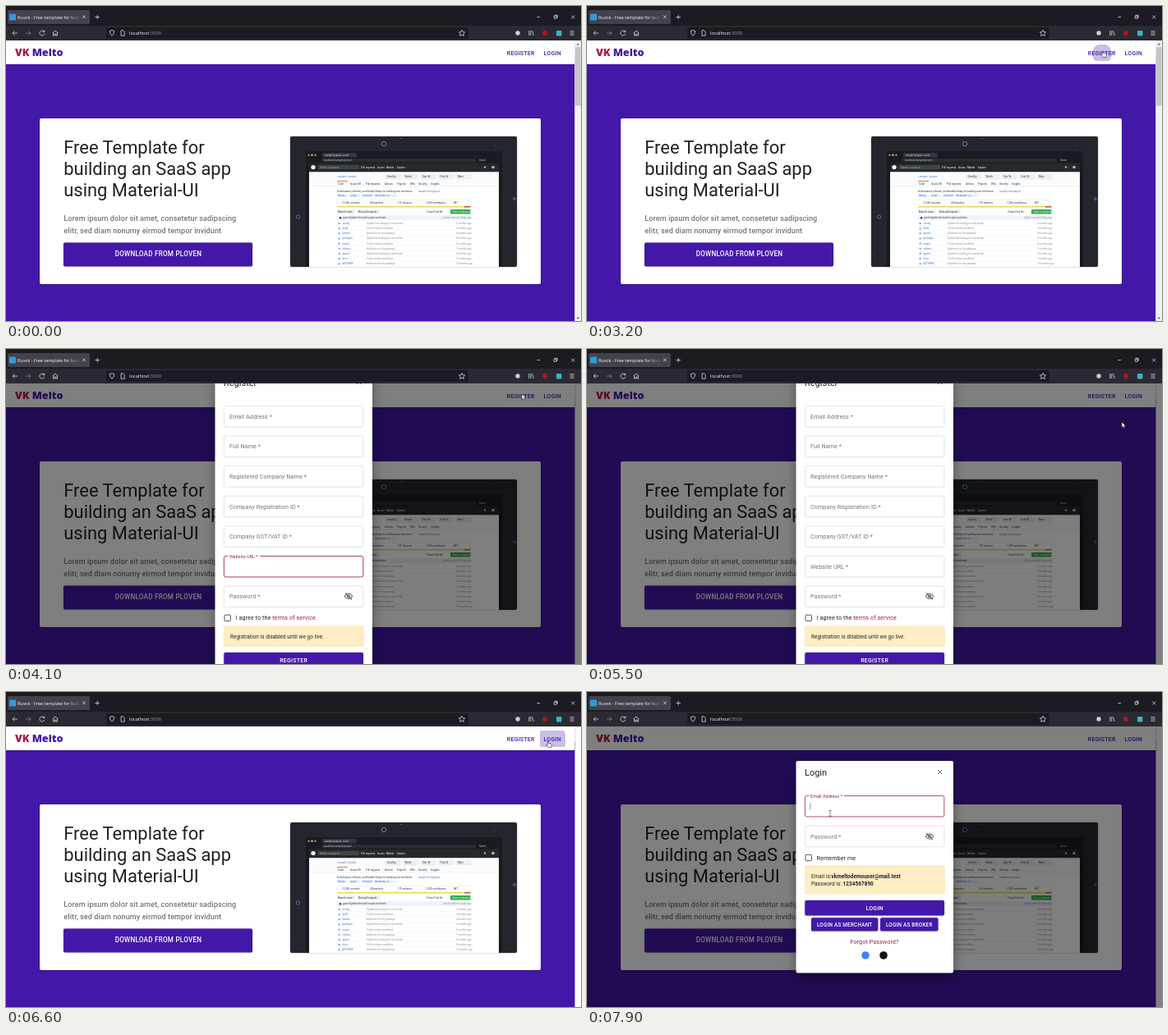
An HTML page that plays this animation: 700 by 384 pixels, repeating every 8000 ms.

```html
<!DOCTYPE html>
<html lang="en">
<head>
<meta charset="utf-8">
<title>App template demo</title>
<style>
  html, body { margin: 0; width: 100%; height: 100%; overflow: hidden; background: #fff; }
  svg { display: block; width: 700px; height: 384px; font-family: Roboto, sans-serif; }
  .ui { font-family: "Open Sans", sans-serif; fill: #fbfbfe; }
  .line { fill: none; stroke: #e4e4ea; stroke-width: .75; }
  .body { font-size: 7.2px; letter-spacing: .07px; }
  .note { font-size: 6.4px; letter-spacing: .06px; fill: #222; }
  .caps { font-weight: 500; font-size: 7px; letter-spacing: .25px; }
  .mid { text-anchor: middle; }
  .tiny { font-size: 3px; }
  .shade { filter: drop-shadow(0 .8px 1px rgba(0, 0, 0, .3)); }
  .lift { filter: drop-shadow(0 6px 7px rgba(0, 0, 0, .35)); }
</style>
</head>
<body>
<svg id="stage" viewBox="0 0 700 384"></svg>
<script>
const PURPLE = '#4318a9', WINE = '#9c1c44', GREY = '#757575', INK = '#212121';
const LOOP = 8000;

const rect = (x, y, w, h, fill, r = 0, more = '') =>
  `<rect x="${x}" y="${y}" width="${w}" height="${h}" fill="${fill}" rx="${r}" ${more}/>`;
const dot = (x, y, r, fill, more = '') => `<circle cx="${x}" cy="${y}" r="${r}" fill="${fill}" ${more}/>`;
const line = (d, more = '') => `<path class="line" d="${d}" ${more}/>`;
const text = (x, y, s, cls, fill, more = '') =>
  `<text x="${x}" y="${y}" class="${cls}" ${fill ? `fill="${fill}"` : ''} ${more}>${s}</text>`;
const size = px => `font-size="${px}"`;

function browserBar() {
  return rect(0, 0, 700, 24.5, '#1c1b22') + rect(0, 24, 700, 18, '#2b2a33') +
    rect(2, 5, 100, 17, '#42414d', 2) + rect(4, 9.5, 8, 8, '#2f9bd8', 1) +
    `<g mask="url(#tabFade)">${text(14, 15.6, 'Ruvok - Free template for build', 'ui', '', size(5.4))}</g>` +
    line('M93 11.5l3.6 3.6m0-3.6l-3.6 3.6M108.5 13.5h5.4m-2.7-2.7v5.4') +
    line('M646.5 13.5h3.6M667.2 12.2h3v3h-3zM668.2 12.2v-1h3v3h-1M688.4 11.6l3.8 3.8m0-3.8l-3.8 3.8') +
    line('M14 33h-6m2.6-2.6l-2.6 2.6l2.6 2.6') +
    line('M24 33h6m-2.6-2.6l2.6 2.6l-2.6 2.6', 'opacity=".5"') +
    line('M46.3 31.2a3 3 0 1 0 .5 2.6M46.8 29.5v2.2h-2.2') +
    line('M56.7 33l3.3-3l3.3 3M57.6 32.3v3.8h1.6v-2h1.6v2h1.6v-3.8') +
    rect(122, 26, 441, 14, '#1c1b22', 2) +
    line('M129 29.6l2.7 .9q0 4-2.7 5.7q-2.7-1.7-2.7-5.7z') +
    line('M140 29.8h2.6l1.6 1.6v4.8h-4.2z') +
    text(150, 35.2, 'localhost<tspan fill="#9a99a2">:3000</tspan>', 'ui', '', size(5.8)) +
    line('M555 29.3l1.1 2.4l2.6 .3l-1.9 1.8l.5 2.6l-2.3-1.3l-2.3 1.3l.5-2.6l-1.9-1.8l2.6-.3z') +
    dot(623, 33, 2.7, '#cfcfd6') +
    line('M636.8 30v6M638.8 30v6M640.4 30.2l2 5.8') +
    dot(656, 33, 3, '#b51622') + rect(670, 30, 6.4, 6.4, '#35b8c4', 1) +
    line('M686.4 30.8h5.2m-5.2 2.2h5.2m-5.2 2.2h5.2');
}

function repoPicture() {
  let seed = 7;
  const rnd = () => (seed = seed * 16807 % 2147483647) / 2147483647;
  const blue = '#3d74c9', pale = '#8a8f96', dark = '#30343a';
  const tiny = (x, y, s, fill) => text(x, y, s, 'tiny', fill);
  let out = rect(346, 159, 276, 159, '#24262d', 2, 'class="shade"');
  for (let i = 0; i < 42; i++) out += dot(348 + rnd() * 272, 161 + rnd() * 155, .25 + rnd() * .35, '#aab');
  out += dot(460, 168, 2.7, 'none', 'stroke="#8a8de0" stroke-width=".8"') +
    dot(355.5, 257, 2.2, 'none', 'stroke="#6f74c8" stroke-width=".8"') +
    line('M619 232.5v5m-2.5-2.5h5', 'style="stroke:#777be0"') +
    rect(365, 177, 239, 141, '#191b20', 2) + rect(385, 179, 42, 5.5, '#33363d', 1);
  ['#ec6a5e', '#f4bf4f', '#61c554'].forEach((c, i) => out += dot(368.5 + i * 4, 181.7, 1.2, c));
  out += tiny(388, 183, 'sample/project: a tool', '#ddd') +
    rect(384, 186, 188, 4.5, '#2a2d33', 2) + tiny(387, 189.3, 'localhost/sample/project', '#bbb') +
    tiny(576, 189.3, 'Guest', '#ccc') +
    rect(369, 191.5, 231, 11, '#24292e') + dot(374, 196.5, 2.6, '#fff') +
    rect(380, 194, 50, 5, '#3f4448', 1) + tiny(382, 197.7, 'Search or jump to', '#aaa') +
    ['Pull requests', 'Issues', 'Market', 'Explore'].map((s, i) =>
      tiny([432, 452, 463, 476][i], 197.6, s, '#fff')).join('') +
    dot(583, 196.5, 1.2, '#bbb') + dot(593, 196.5, 1.8, '#bbb') +
    rect(369, 202.5, 231, 115.5, '#fff') + rect(369, 202.5, 231, 17.5, '#fafbfc') +
    tiny(403, 209.3, '▪ sample / project', blue);
  for (let i = 0; i < 5; i++)
    out += rect(462 + i * 21.5, 205.7, 18, 5, '#eef0f2', .8, 'stroke="#ccc" stroke-width=".3"') +
      tiny(464 + i * 21.5, 209.3, ['Used by', 'Watch', 'Star 9k', 'Fork 2k', 'More'][i], dark);
  out += rect(403, 213, 13, .8, '#e36209');
  ['Code', 'Issues 50', 'Pull requests', 'Actions', 'Projects', 'Wiki', 'Security', 'Insights'].forEach((s, i) =>
    out += tiny(404 + [0, 15, 34, 57, 72, 88, 98, 113][i], 217.5, s, dark));
  out += rect(369, 219.8, 231, .4, '#ddd') +
    tiny(403, 226.7, 'A declarative, efficient, and flexible library for building user interfaces.', dark) +
    tiny(502, 226.7, 'sample.test/project', blue);
  ['library', 'script', 'frontend', 'declarative', 'ui'].forEach((s, i) =>
    out += rect(403 + i * 15, 229.4, 13.5, 3.6, '#e7f1fb', .8) + tiny(404 + i * 15, 232.2, s, blue));
  out += rect(403, 236.5, 162, 7.5, '#fff', 0, 'stroke="#ddd" stroke-width=".4"');
  ['12,345 commits', '40 branches', '110 releases', '1,200 contributors', 'MIT'].forEach((s, i) =>
    out += tiny(409 + i * 34, 241.3, s, dark));
  out += rect(403, 244, 158, 1.5, '#ecdc4f') + rect(558, 244, 7.5, 1.5, '#c9533d') +
    rect(403, 248.2, 22, 5, '#eef0f2', .6) + tiny(404, 251.8, 'Branch: main', dark) +
    rect(427, 248.2, 28, 5, '#eef0f2', .6) + tiny(429, 251.8, 'New pull request', dark) +
    tiny(512, 251.8, 'Create  Find file', dark) +
    rect(541, 248, 24.5, 5.4, '#2faa4b', .6) + tiny(543, 251.8, 'Clone or download', '#fff') +
    rect(403, 255.2, 162.5, 6, '#edf3fa') + dot(407, 258.2, 1.2, '#333') +
    tiny(410, 259.2, 'guest Update the build scripts and tests', dark) + tiny(532, 259.2, 'Latest commit 2 days ago', pale);
  const names = ['.config', '.build', 'fixtures', 'packages', 'scripts', '.editorrc', '.ignore', '.lintrc', 'AUTHORS'];
  names.forEach((s, i) => {
    const y = 266 + i * 6.15;
    out += rect(403, y + 1.6, 162.5, .3, '#e4e6e8') + rect(404.5, y - 2, 2.3, 2, '#79a9d9', .3) +
      tiny(409, y, s, blue) +
      tiny(439, y, ['Update the tooling for new builds', 'Fix the release workflow', 'Add tests for the package'][i % 3], pale) +
      tiny(548, y, (i + 2) + ' months ago', pale);
  });
  return out;
}

function page() {
  const title = ['Free Template for', 'building an SaaS app', 'using Material-UI'];
  const lead = ['Lorem ipsum dolor sit amet, consetetur sadipscing', 'elitr, sed diam nonumy eirmod tempor invidunt'];
  return rect(0, 42, 700, 342, '#fff') + rect(0, 60, 692.5, 324, PURPLE) +
    rect(0, 42, 692.5, 29, '#fff', 0, 'class="shade"') +
    text(11, 61.3, `VK <tspan fill="${PURPLE}">Melto</tspan>`, '', '#b01550',
      'font-family="Open Sans, sans-serif" font-weight="800" font-size="12.6"') +
    `<g clip-path="url(#navClip)"><circle id="ripple" fill="${PURPLE}"/></g>` +
    text(609.8, 59.6, 'REGISTER', 'caps', PURPLE) + text(654.5, 59.6, 'LOGIN', 'caps', PURPLE) +
    rect(41, 137, 610, 202, '#fff', 2, 'class="shade"') +
    title.map((s, i) => text(70.3, 180 + i * 25.8, s, '', INK, size(21.9))).join('') +
    lead.map((s, i) => text(70.3, 262.3 + i * 14.6, s, '', GREY, 'font-weight="500" letter-spacing=".07" font-size="9.1"')).join('') +
    rect(70, 288.5, 230, 29, PURPLE, 1.8, 'class="shade"') +
    text(185.5, 305.3, 'DOWNLOAD FROM PLOVEN', 'mid', '#fff', 'font-weight="500" letter-spacing=".23" font-size="8.15"') +
    repoPicture() +
    `<g id="scroll">${rect(692.5, 42, 7.5, 342, '#f1f1f1')}${rect(693, 50, 6.5, 71.5, '#c6c6c6')}
      <path fill="#555" d="M694.5 47.5l1.8-2l1.8 2zM694.5 379.8l1.8 2l1.8-2z"/></g>`;
}

const eye = y => `<g transform="translate(417 ${y})" fill="none" stroke="#666" stroke-width="1.1">
  <path d="M-4.8 0Q0-6.4 4.8 0Q0 6.4-4.8 0zM-4-4L4 4"/><circle r="1.5"/></g>`;
const cross = y => line(`M427 ${y - 2.6}l5.2 5.2m0-5.2l-5.2 5.2`, 'style="stroke:#555;stroke-width:1"');
const alertBox = (y, h) => rect(265.3, y, 170, h, '#ffedc4', 1.5, 'stroke="#f8dea2" stroke-width=".6"');
const check = (y, s) => rect(266, y - 3.6, 7.4, 7.4, 'none', .8, 'stroke="#555" stroke-width="1"') +
  text(279.6, y + 2.6, s, 'body', INK);
const button = (x, y, w, h, s, px = 7) => rect(x, y, w, h, PURPLE, 1.8, 'class="shade"') +
  text(x + w / 2, y + h / 2 + 2.5, s, 'caps mid', '#fff', `style="font-size:${px}px"`);
const field = (y, s) => rect(265.3, y - 12.8, 169.6, 25.6, '#fff', 2, 'stroke="#cfcfcf" stroke-width=".6"') +
  text(272, y + 2.5, s + ' *', 'body', GREY);
const focused = (y, s, gap, id) => `<g id="${id}">` +
  rect(265.4, y - 12.7, 169.4, 25.4, '#fff', 2, `stroke="${WINE}" stroke-width=".8"`) +
  rect(270, y - 14, gap, 3, '#fff') + text(272, y - 10.7, s + ' *', '', WINE, size(5.5)) +
  `<path class="caret" stroke="#555" stroke-width=".6" d="M271.8 ${y - 4.5}v9"/></g>`;

function registerDialog() {
  const labels = ['Email Address', 'Full Name', 'Registered Company Name', 'Company Registration ID',
    'Company GST/VAT ID', 'Website URL', 'Password'];
  return rect(254.5, 30, 191.5, 370, '#fff', 0, 'class="lift"') +
    text(265, 45, 'Register', '', INK, size(11)) + cross(40.5) +
    labels.map((s, i) => field(82.2 + i * 36.6, s)).join('') +
    focused(265.2, 'Website URL', 39, 'urlFocus') + eye(301.5) +
    check(327.8, `I agree to the <tspan fill="${WINE}">terms of service</tspan>`) +
    alertBox(338, 24.3) + text(273, 352.5, 'Registration is disabled until we go live.', 'note') +
    button(265.3, 370, 169.7, 19, 'REGISTER');
}

function loginDialog() {
  return rect(254.5, 84, 191.5, 258.5, '#fff', 2, 'class="lift"') +
    text(265, 102, 'Login', '', INK, size(11)) + cross(97.5) +
    focused(139.3, 'Email Address', 43, 'mailFocus') + field(176, 'Password') + eye(176) +
    check(201.9, 'Remember me') + alertBox(212, 34) +
    text(273, 226.8, 'Email is:<tspan font-weight="700">vkmeltodemouser@mail.test</tspan>', 'note') +
    text(273, 236, 'Password is: <tspan font-weight="700">1234567890</tspan>', 'note') +
    button(265.3, 254, 169.7, 18.5, 'LOGIN') +
    button(273, 275.3, 81.3, 16.3, 'LOGIN AS MERCHANT', 6.3) +
    button(357, 275.3, 70.5, 16.3, 'LOGIN AS BROKER', 6.3) +
    text(350, 306.8, 'Forgot Password?', 'body mid', WINE) +
    dot(339, 321, 4.8, '#4285f4') + dot(361, 321, 4.8, '#111');
}

const stage = document.getElementById('stage');
stage.innerHTML = `<defs>
  <linearGradient id="fade"><stop offset=".8" stop-color="#fff"/><stop offset="1" stop-color="#000"/></linearGradient>
  <mask id="tabFade"><rect x="13" y="5" width="78" height="17" fill="url(#fade)"/></mask>
  <clipPath id="navClip"><rect id="navItem" y="47" height="20" rx="1.5"/></clipPath>
  </defs>${page()}
  <rect id="dim" y="42" width="700" height="342"/>
  <g id="register">${registerDialog()}</g><g id="login">${loginDialog()}</g>
  ${browserBar()}
  <g id="cursor" stroke-width=".6">
    <path id="arrow" fill="#fff" stroke="#222" d="M0 0v6.6l1.6-1.4l1 2.2l1.2-.5l-1-2.2h2.1z"/>
    <path id="hand" fill="#fff" stroke="#222" d="M-.7 0q.7-.8 1.3 0v2.5l3 .6q.8.2.7 1l-.5 3.4h-3.9l-2.1-3q.3-.9 1.5.1z"/>
    <path id="beam" fill="none" stroke="#333" d="M-1.5-3.5h3M0-3.5v7M-1.5 3.5h3"/>
  </g>`;

const $ = id => document.getElementById(id);
const set = (id, attrs) => { for (const k in attrs) $(id).setAttribute(k, attrs[k]); };
const show = (id, on) => $(id).style.display = on ? '' : 'none';
const clamp = v => Math.max(0, Math.min(1, v));
const easeOut = u => 1 - (1 - u) ** 2;
const smooth = u => u * u * (3 - 2 * u);

// Pointer path: time, x, y
const path = [[1000, 698, 230], [1700, 614, 59], [2400, 614, 59], [3100, 628, 55], [4600, 628, 55],
  [5400, 651, 89], [6200, 651, 89], [6500, 660, 60], [6600, 660, 60], [6800, 502, 147], [7500, 296, 148]];

function pointer(t) {
  const i = path.findIndex(p => p[0] > t);
  if (i < 0) return path[path.length - 1].slice(1);
  const [a, b] = [path[Math.max(0, i - 1)], path[i]];
  const u = i ? smooth((t - a[0]) / (b[0] - a[0])) : 0;
  return [a[1] + (b[1] - a[1]) * u, a[2] + (b[2] - a[2]) * u];
}

function draw(t) {
  const reg = easeOut(clamp((t - 3280) / 225)) * (1 - easeOut(clamp((t - 5550) / 200)));
  const log = easeOut(clamp((t - 6600) / 200));
  set('dim', { opacity: .5 * Math.max(reg, log) });
  set('register', { opacity: reg });
  set('login', { opacity: log });
  show('register', reg > 0);
  show('login', log > 0);
  show('scroll', !(t >= 3280 && t < 5750) && t < 6600);
  show('urlFocus', t < 5400);

  const opened = t < 6000 ? 3280 : 6650;
  const caretOn = (t - opened + 1060) % 1060 < 530;
  document.querySelectorAll('.caret').forEach(c => c.style.opacity = caretOn ? 1 : 0);

  const onLogin = t >= 6500;
  const age = t - (onLogin ? 6500 : 3200);
  set('navItem', onLogin ? { x: 650, width: 31 } : { x: 605, width: 44.5 });
  set('ripple', {
    cx: onLogin ? 661 : 627, cy: 58,
    r: Math.min(26, 12 + Math.max(0, age) * .09),
    opacity: age < 0 ? 0 : .28 * (1 - clamp((age - 200) / 200))
  });

  const [x, y] = pointer(t);
  const inField = t >= 7200 && x < 435;
  const overNav = y > 47 && y < 67 && x > 605 && x < 682 && !(reg > .9);
  set('cursor', { transform: `translate(${x} ${y})` });
  show('cursor', t >= 1000);
  show('beam', inField);
  show('hand', overNav && !inField);
  show('arrow', !overNav && !inField);
}

function tick(now) {
  draw(Math.floor(now % LOOP / 100) * 100);
  requestAnimationFrame(tick);
}
requestAnimationFrame(tick);
</script>
</body>
</html>
```
